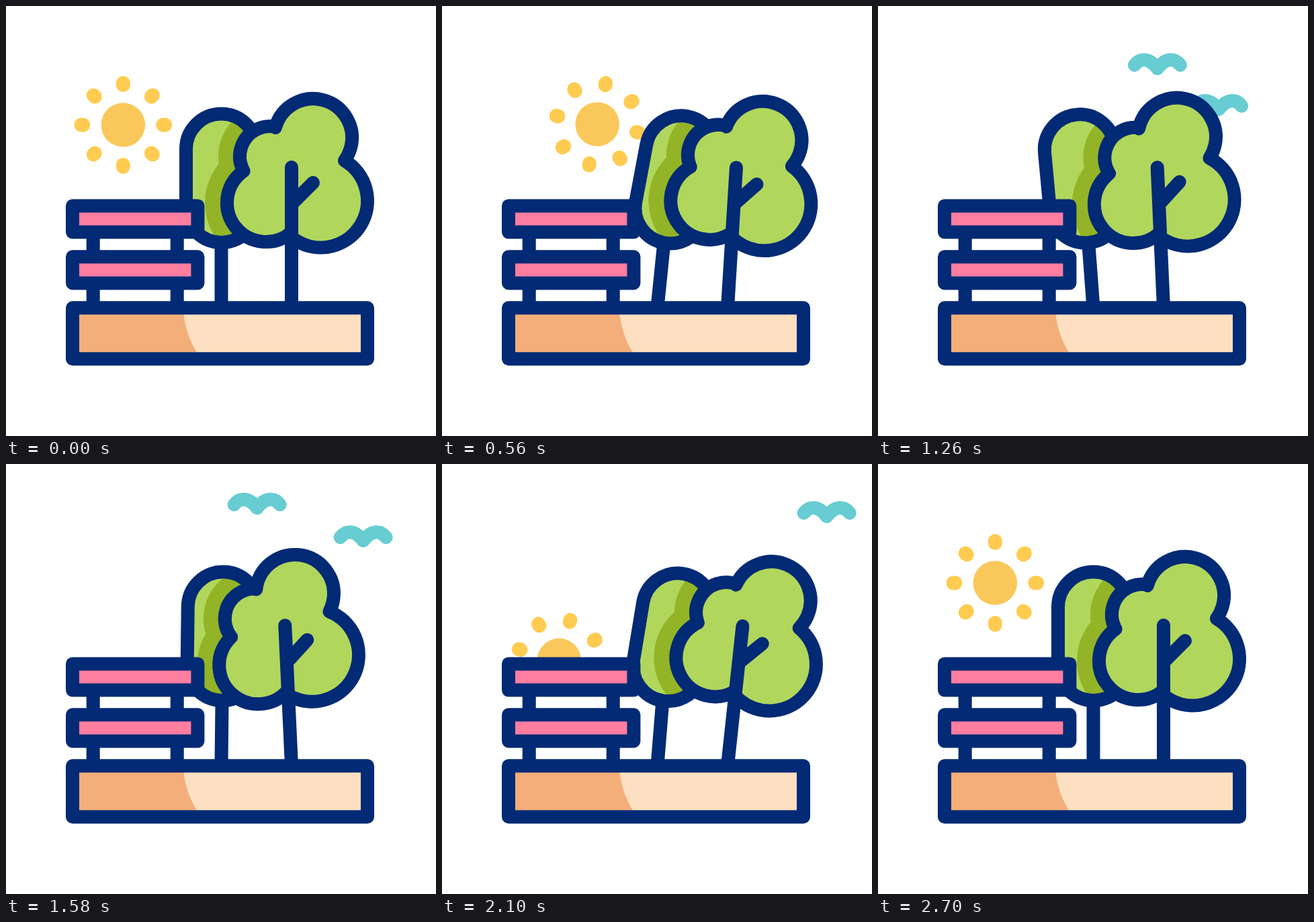
Animation of 640x640 px, one loop 3 s. Source, as an HTML page with a canvas:

```html
<!DOCTYPE html>
<html lang="en">
<head>
<meta charset="utf-8">
<title>Park</title>
<style>
html, body { margin: 0; width: 100%; height: 100%; overflow: hidden; background: #fff; }
canvas { display: block; width: 100vw; height: 100vh; }
</style>
</head>
<body>
<canvas id="stage" width="640" height="640"></canvas>
<script>
const ctx = document.getElementById('stage').getContext('2d');
const LOOP = 3000;
const NAVY = '#022a75', LEAF = '#b1d65c', LEAF_DARK = '#93b426';
const PINK = '#ff7d9f', SAND = '#fbdfc0', SAND_DARK = '#f3ae79';
const SUN = '#fac85a', RAY = '#ffcb50', BIRD = '#67cdd2';

const clamp = v => Math.min(1, Math.max(0, v));
const ease = v => { v = clamp(v); return v * v * (3 - 2 * v); };
const mix = (a, b, u) => a + (b - a) * u;
const bezier = (a, b, c, d, u) => {
  const w = 1 - u;
  return a * w * w * w + 3 * b * u * w * w + 3 * c * u * u * w + d * u * u * u;
};

// keys: [time, value] pairs, eased in and out between neighbours
function track(keys, t) {
  for (let i = 1; i < keys.length; i++) {
    const [t0, v0] = keys[i - 1], [t1, v1] = keys[i];
    if (t < t1) return mix(v0, v1, ease((t - t0) / (t1 - t0)));
  }
  return keys[keys.length - 1][1];
}
const swing = (start, values) => values.map((v, i) => [start + i * 560, v]);

const BACK_TRUNK = swing(200, [0, 8.2, -4.7, 7.1, 0]);
const BACK_CROWN = swing(260, [0, 8.7, -2.3, 5.9, 0]);
const FRONT_TRUNK = swing(300, [0, 7.9, -5.1, 7, 0]);
const FRONT_CROWN = [[360, 0], [920, 6.6], [1560, -6], [2160, 3], [2700, 0]];

const pivot = (m, x, y, deg) => m.translate(x, y).rotate(deg).translate(-x, -y);

// Outline of the front crown: four arcs through the notches between lobes
const LOBES = [[457, 196, 58], [468.5, 290, 69.5], [387, 293, 58], [393, 224, 45]];
const NOTCHES = [[401, 181], [504, 230], [424.5, 339], [353, 244.5]];
const frontCrown = new Path2D();
LOBES.forEach(([x, y, r], i) => {
  const [ax, ay] = NOTCHES[i], [bx, by] = NOTCHES[(i + 1) % 4];
  frontCrown.arc(x, y, r, Math.atan2(ay - y, ax - x), Math.atan2(by - y, bx - x));
});
frontCrown.closePath();

const backCrown = new Path2D();
backCrown.arc(320.5, 213, 52.5, Math.PI, 0);
backCrown.arc(320.5, 299.5, 52.5, 0, Math.PI);
backCrown.closePath();

const shade = new Path2D();
shade.arc(393, 224, 77, 0, 7);
shade.closePath();
shade.moveTo(478, 293);
shade.arc(387, 293, 91, 0, 7);

const frontWood = new Path2D('M425 240V449M425 295L457 263');
const backWood = new Path2D('M320.5 350V449');
const birdShape = new Path2D('M-34 0C-26-11-12-11 0 5C12-11 26-11 34 0');
const groundShade = new Path2D('M100 450H263.5Q266 490 289 524H100Z');

function stroke(path, color = NAVY) {
  ctx.strokeStyle = color;
  ctx.lineWidth = 20;
  ctx.stroke(path);
}
function fill(path, color) {
  ctx.fillStyle = color;
  ctx.fill(path);
}

function drawSun(t) {
  let x = 174.3, y, turn;
  if (t < 1350) {
    const u = ease((t - 200) / 1150);
    x = bezier(x, 255, 345, 348, u);
    y = bezier(177, 170, 180, 290, u);
    turn = 49 * u;
  } else if (t >= 1800) {
    const u = ease((t - 1800) / 900);
    y = mix(333, 177, u);
    turn = mix(50, 90, u);
  } else return;
  ctx.save();
  ctx.beginPath();
  ctx.rect(0, 0, 640, 297);
  ctx.clip();
  ctx.translate(x, y);
  ctx.rotate(turn * Math.PI / 180);
  ctx.fillStyle = SUN;
  ctx.beginPath();
  ctx.arc(0, 0, 32.8, 0, 7);
  ctx.fill();
  ctx.strokeStyle = RAY;
  ctx.lineWidth = 21;
  for (let i = 0; i < 8; i++) {
    ctx.beginPath();
    ctx.moveTo(0, -59.5);
    ctx.lineTo(0, -62.3);
    ctx.stroke();
    ctx.rotate(Math.PI / 4);
  }
  ctx.restore();
}

function drawBird(x, y, alpha) {
  if (alpha <= 0) return;
  ctx.save();
  ctx.globalAlpha = alpha;
  ctx.translate(x, y);
  stroke(birdShape, BIRD);
  ctx.restore();
}

function drawBirds(t) {
  const d = t - 1260;
  if (t > 560) {
    drawBird(416 - .124 * d - .0000245 * d * d, 88 - .1125 * d + .0000825 * d * d,
      clamp((1957 - t) / 220));
  }
  if (t > 900) {
    drawBird(507 + .076 * d + .0000025 * d * d, 149 - .145 * d + .0000648 * d * d,
      clamp((2360 - t) / 220));
  }
}

function drawTrees(t) {
  const backTrunk = pivot(new DOMMatrix(), 320.5, 449, track(BACK_TRUNK, t));
  const back = pivot(backTrunk, 320.5, 350, track(BACK_CROWN, t));
  const frontTrunk = pivot(new DOMMatrix(), 425, 449, track(FRONT_TRUNK, t));
  const front = pivot(frontTrunk, 425, 340, track(FRONT_CROWN, t));

  ctx.save();
  ctx.setTransform(backTrunk);
  stroke(backWood);
  ctx.setTransform(back);
  fill(backCrown, LEAF);
  ctx.save();
  ctx.clip(backCrown);
  ctx.setTransform(front);
  fill(shade, LEAF_DARK);
  ctx.restore();
  stroke(backCrown);

  ctx.setTransform(front);
  fill(frontCrown, LEAF);
  stroke(frontCrown);
  ctx.setTransform(frontTrunk);
  stroke(frontWood);
  ctx.restore();
}

function box(x, y, w, h, color, detail) {
  const path = new Path2D();
  path.rect(x, y, w, h);
  fill(path, color);
  if (detail) detail();
  stroke(path);
}

function drawBench() {
  stroke(new Path2D('M129.7 337V449M254.7 337V449'));
  box(99, 297.4, 186.4, 39.2, PINK);
  box(99, 373.2, 186.4, 39.2, PINK);
}

function draw(t) {
  ctx.fillStyle = '#fff';
  ctx.fillRect(0, 0, 640, 640);
  ctx.lineCap = ctx.lineJoin = 'round';
  drawSun(t);
  drawBirds(t);
  drawTrees(t);
  drawBench();
  box(99, 449.2, 439, 76, SAND, () => fill(groundShade, SAND_DARK));
}

const begin = performance.now();
function tick() {
  draw((performance.now() - begin) % LOOP);
  requestAnimationFrame(tick);
}
tick();
</script>
</body>
</html>
```
